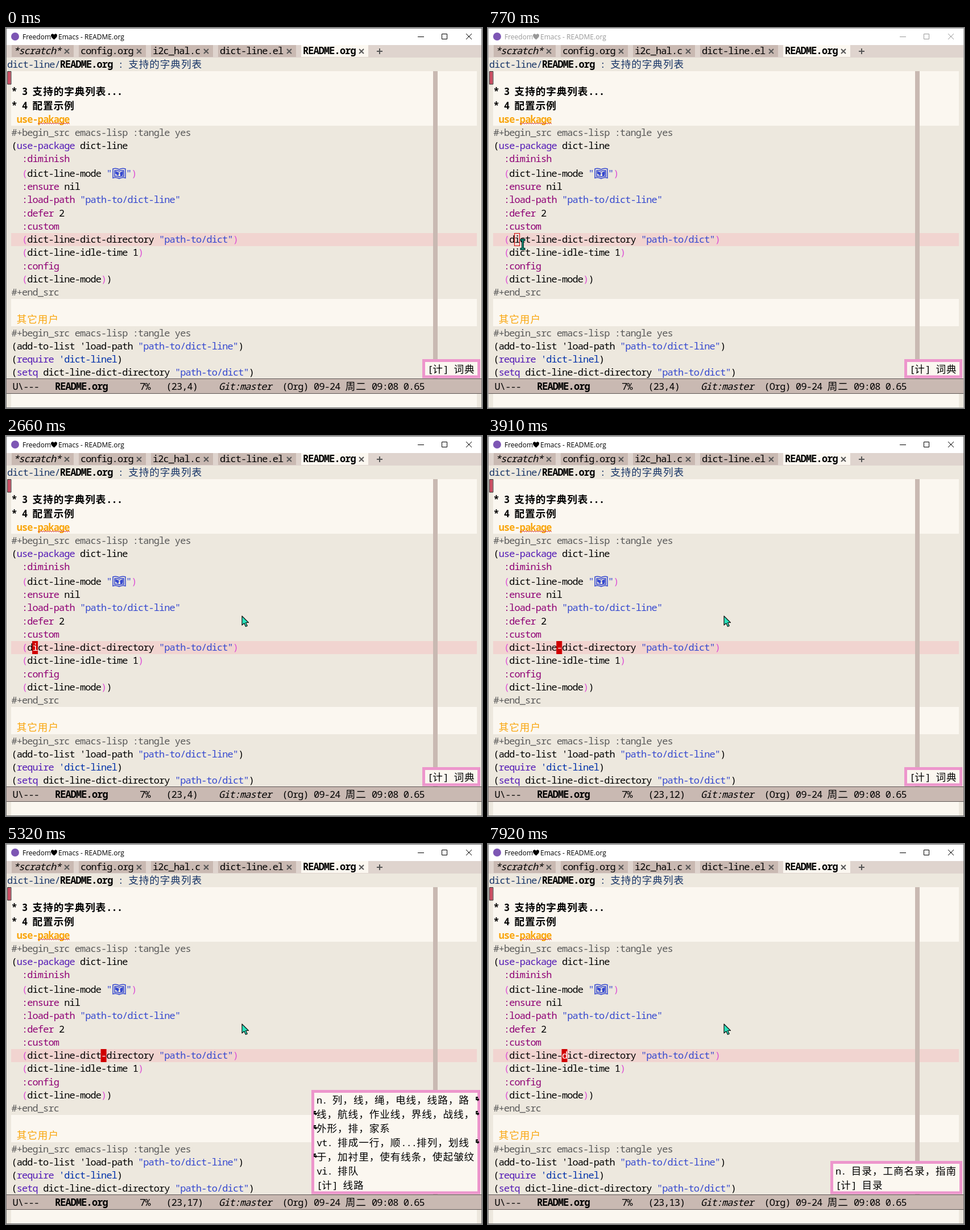
An HTML page for the animation above (8000 ms loop, 837 px wide and 669 px high).

```html
<!DOCTYPE html>
<html lang="zh">
<head>
<meta charset="utf-8">
<title>dict-line</title>
<style>
html, body { margin: 0; width: 100%; height: 100%; overflow: hidden; background: #fbf7f0; }
svg { display: block; width: 837px; height: 669px; }
text {
  font: 17px "Noto Sans Mono", "DejaVu Sans Mono", monospace;
  letter-spacing: calc(9.27px - .6em);
  white-space: pre;
  fill: #000;
}
.cjk { font: 17.6px "Noto Sans CJK SC", "Noto Sans CJK", sans-serif; letter-spacing: .94px; }
.b, .b .cjk, .o { font-weight: 700; }
.i { font-style: italic; }
.m { font-weight: 500; }
.c { fill: #595959; }          /* block markers */
.k { fill: #531ab6; }          /* keywords */
.p { fill: #8f0075; }          /* properties */
.s { fill: #3548cf; }          /* strings */
.q { fill: #0031a9; }          /* symbols */
.r { fill: #dd4fd5; }          /* inner parens */
.h { fill: #193668; }          /* header line */
.o, .y { fill: #f9a60e; }      /* sub-headings */
.dim { fill: #ede8de; }
.lit { fill: #fbf7f0; }
.bar { fill: #c9b9b2; }
.w { fill: #fff; }
#title { --ink: #000; }
#title.off { --ink: #999; }
#title text { font: 12px "Open Sans", "Noto Sans", sans-serif; letter-spacing: 0; fill: var(--ink); }
#title .heart { fill: var(--ink); }
#title .btn { fill: none; stroke: var(--ink); }
.edge { fill: none; stroke: #6e6e6e; stroke-width: 2; }
.off ~ .edge { stroke: #a2a2a2; }
.pop rect { fill: #fbf7f0; stroke: #ed96cc; stroke-width: 5; }
.hook { fill: none; stroke: #000; stroke-width: 1.8; }
</style>
</head>
<body>
<svg id="stage" viewBox="0 0 837 669"></svg>
<script>
const LOOP = 8000, CELL = 9.27, LEFT = 9.5;
const stage = document.getElementById('stage');
const CJK = /[\u3000-\u9fff\uff00-\uffef]+/g;

// {x|text} gives text the class x
const rich = s => s
  .replace(CJK, m => `<tspan class="cjk">${m}</tspan>`)
  .replace(/\{(\w)\|(.*?)\}/g, '<tspan class="$1">$2</tspan>');
const text = (x, y, s, attrs = '') => `<text x="${x}" y="${y}" ${attrs}>${rich(s)}</text>`;
const rect = (x, y, x2, y2, cls) =>
  `<rect x="${x}" y="${y}" width="${x2 - x}" height="${y2 - y}" class="${cls}"/>`;
const cross = (x, y, r) => `M${x - r} ${y - r}l${2 * r} ${2 * r}m0 ${-2 * r}l${-2 * r} ${2 * r}`;

const tabs = [
  [10, 119, '{i|*scratch*}'], [128, 246, '{m|config.org}'], [255, 364, '{m|i2c_hal.c}'],
  [373, 510, '{m|dict-line.el}'], [519, 637, '{b|README.org}']
];

const target = '  (dict-line-dict-directory "path-to/dict")';
const rows = [
  [118, '{b|* 3 支持的字典列表...}'],
  [143, '{b|* 4 配置示例}'],
  [167, ' {o|use-pakage}'],
  [190, '{c|#+begin_src emacs-lisp :tangle yes}'],
  [213, '({k|use-package} dict-line'],
  [236, '  {p|:diminish}'],
  [262, '  {r|(}dict-line-mode {s|"}'],
  [285, '  {p|:ensure} nil'],
  [308, '  {p|:load-path} {s|"path-to/dict-line"}'],
  [332, '  {p|:defer} 2'],
  [355, '  {p|:custom}'],
  [378, '  {r|(}dict-line-dict-directory {s|"path-to/dict"}{r|)}'],
  [401, '  {r|(}dict-line-idle-time 1{r|)}'],
  [425, '  {p|:config}'],
  [448, '  {r|(}dict-line-mode{r|)})'],
  [471, '{c|#+end_src}'],
  [519, ' {y|其它用户}'],
  [543, '{c|#+begin_src emacs-lisp :tangle yes}'],
  [566, `(add-to-list 'load-path {s|"path-to/dict-line"})`],
  [589, `({k|require} {q|'dict-linel})`],
  [612, '({k|setq} dict-line-dict-directory {s|"path-to/dict"})']
];

const popups = [
  [732, 583, ['[计] 词典']],
  [537, 433, ['n. 列，线，绳，电线，线路，路', '线，航线，作业线，界线，战线，', '外形，排，家系',
    'vt. 排成一行，顺...排列，划线', '于，加衬里，使有线条，使起皱纹', 'vi. 排队', '[计] 线路']],
  [602, 558, ['n. 目录，工商名录，指南', '[计] 目录']]
];
const hooks = [[828, 449], [543, 474], [828, 474], [543, 499], [828, 524], [543, 549]];

function popup([x, y, lines], n) {
  const body = lines.map((s, i) => text(x + 9, 607 - 25 * (lines.length - 1 - i), s)).join('');
  const marks = n === 1 ? hooks.map(([hx, hy]) =>
    `<path class="hook" d="M${hx + 2} ${hy - 3}h-3v4h4m-2 -2l2 2l-2 2"/>`).join('') : '';
  return `<g class="pop"><rect x="${x + 2.5}" y="${y + 2.5}" width="${97 + 732 - x}" height="${612 - y - 0.5}"/>${body}${marks}</g>`;
}

function wave(x, x2, y) {
  let d = `M${x} ${y}`;
  for (let i = 0; x + i * 2 < x2; i++) d += `l2 ${i % 2 ? 2 : -2}`;
  return `<path d="${d}" fill="none" stroke="#d0302a"/>`;
}

stage.innerHTML = `
  <rect width="837" height="669" class="dim"/>
  <g id="title">
    <rect width="837" height="30" fill="#fff"/>
    <circle cx="16" cy="15" r="7" fill="#7d56b4"/>
    ${text(29, 20, 'Freedom')}
    <path class="heart" d="M84.5 20.5C81 17.5 79 15.5 79 13.2C79 10 83.2 9.400 84.500 12C85.800 9.400 90 10 90 13.200C90 15.500 88 17.500 84.500 20.500Z"/>
    ${text(92, 20, 'Emacs - README.org')}
    <path class="btn" d="M724 15.500H735M766.500 10.500h9v9h-9z${cross(814, 15, 5)}"/>
  </g>
  ${rect(1, 30, 836, 52, 'tabs').replace('class="tabs"', 'fill="#dfd4ce"')}
  ${tabs.map(([x, x2, s], i) => rect(x, 30, x2, 51, i === 4 ? 'lit' : 'bar') + text(x + 3, 46, s)
    + `<path d="${cross(x2 - 12, 41, 4)}" stroke="#555" stroke-width="2"/>`).join('')}
  <path d="M652 41h10m-5 -5v10" stroke="#555" stroke-width="2"/>
  ${text(2, 70, '{h|dict-line/}{b|README.org} {h|: 支持的字典列表}')}
  ${rect(9, 76, 828, 172, 'lit')}
  ${rect(9, 477, 828, 525, 'lit')}
  <rect x="9" y="361" width="819" height="23" fill="#f1d4d0"/>
  ${rect(751, 76, 759, 617, 'bar')}
  <rect x="2" y="77" width="6.500" height="22" fill="#cb5064"/>
  <path d="M2.500 76.500V99H9V76.500Z" fill="none" stroke="#333"/>
  ${rows.map(([y, s]) => text(LEFT, y, s)).join('')}
  ${wave(56, 111, 169)}
  <g fill="none" stroke="#3548cf" stroke-width="1.500">
    <path d="M188 248q5.500 -2 11 1q5.500 -3 11 -1v16q-5.500 -2 -11 1q-5.500 -3 -11 -1z"/>
    <path d="M191 251q4 -1 8 1q4 -2 8 -1v10q-4 -1 -8 1q-4 -2 -8 -1z"/>
    <path d="M193 253l5 2l-1 4l-4 -3zM201 255l4 -2v5l-3 2z" fill="#3548cf"/>
  </g>
  ${text(211, 262, '{s|"}{r|)}')}
  <g id="cursor"><rect y="361.500" width="9" height="22" stroke="#d00000"/><text class="w" y="378"></text></g>
  ${rect(1, 617, 836, 644, 'bar')}
  <path d="M1 617.500H836M1 643.500H836" stroke="#5d5654"/>
  ${text(11.6, 637, 'U\\---')}${text(86, 637, '{b|README.org}')}${text(235, 637, '7%')}
  ${text(281.500, 637, '', 'id="place"')}
  ${text(374, 637, '{i|Git:master}')}${text(485.500, 637, '(Org) 09-24 周二 09:08 0.65')}
  ${rect(9, 644, 828, 668, 'lit')}
  ${popups.map(popup).join('')}
  <rect class="edge" x="0" y="0" width="837" height="669"/>
  <g id="mouse">
    <path id="arrow" d="M0 0V16L3.800 12.600L6.500 18.500L9.300 17.200L6.600 11.500H11.500Z" fill="#2be3bd" stroke="#111" stroke-width="1.200" stroke-linejoin="round"/>
    <g id="beam" fill="none"><path d="M-4.500 -8H4.500M-4.500 8H4.500M0 -8V8" stroke="#0a2a26" stroke-width="4"/>
    <path d="M-3.500 -8H3.500M-3.500 8H3.500M0 -8V8" stroke="#12a488" stroke-width="1.600"/></g>
  </g>`;

const $ = id => document.getElementById(id);
const title = $('title'), cursor = $('cursor'), place = $('place');
const mouse = $('mouse'), arrow = $('arrow'), beam = $('beam');
const [block, glyph] = cursor.children;
const pops = [...document.querySelectorAll('.pop')];
const show = (el, on) => el.setAttribute('visibility', on ? 'visible' : 'hidden');

const BLUR = 60, FOCUS = 900;
const moves = [[0, 4], [2870, 7], [3080, 12], [4650, 17], [5860, 27], [6960, 18], [7920, 13]];
const shown = [[0, 0], [4010, 1], [5530, 0], [6700, 2]];
const flips = [FOCUS, 1830, 1910, 2100, 2290, 2480, 2660, 3730, 3910, 4090, 4300, 4490, 4650,
  5260, 5320, 5480, 5710, 6490, 6680, 6880, 6960, 7580, 7660, 7840, 7920];
const at = (list, t) => list.filter(e => e[0] <= t).pop()[1];

// pointer path: start, end, from, to, easing
const path = [
  [20, 770, [600, 669], [61, 381], u => u * u * (3 - 2 * u)],
  [870, 1410, [61, 381], [342, 325], u => u ** 1.4],
  [1410, 1540, [342, 325], [415, 317], u => 1 - (1 - u) ** 1.4]
];
function pointer(t) {
  const [a, b, p, q, ease] = path.filter(s => s[0] <= t).pop() || path[0];
  const u = ease(Math.min(1, Math.max(0, (t - a) / (b - a))));
  return p.map((v, i) => v + (q[i] - v) * u);
}

function draw(t) {
  const blurred = t >= BLUR && t < FOCUS;
  title.classList.toggle('off', blurred);
  document.querySelector('.edge').style.stroke = blurred ? '#a2a2a2' : '';

  const col = at(moves, t), x = LEFT + col * CELL;
  const on = flips.filter(f => f <= t).length % 2 === 1;
  show(cursor, on || blurred);
  block.setAttribute('x', x - 2.6 + 2.6);
  block.setAttribute('fill', blurred ? 'none' : '#d00000');
  glyph.setAttribute('x', x);
  glyph.textContent = blurred ? '' : target[col];
  place.textContent = `(23,${col})`;

  const n = at(shown, t);
  pops.forEach((p, i) => show(p, i === n));

  const [mx, my] = pointer(t), onText = mx < 190;
  mouse.setAttribute('transform', `translate(${mx.toFixed(1)} ${my.toFixed(1)})`);
  show(arrow, t >= 20 && !onText);
  show(beam, t >= 20 && onText);
}

let start;
function tick(now) {
  start ??= now;
  draw((now - start) % LOOP);
  requestAnimationFrame(tick);
}
draw(0);
requestAnimationFrame(tick);
</script>
</body>
</html>
```
